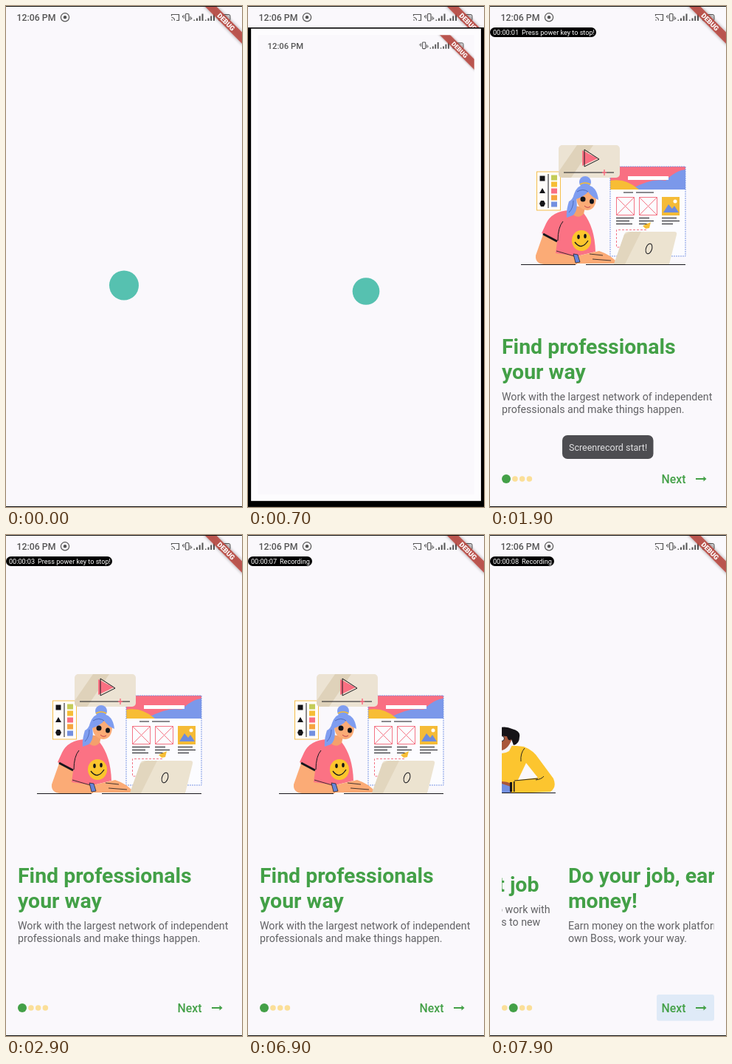
These frames come from a looping animation (320 by 677 pixels, 8000 ms). An HTML page:

```html
<!DOCTYPE html>
<html lang="en">
<head>
<meta charset="utf-8">
<title>Onboarding</title>
<style>
  html, body { margin: 0; width: 100%; height: 100%; overflow: hidden; background: #faf8fc; }
  svg { display: block; font-family: Roboto, sans-serif; }
  .title { font-size: 28.45px; font-weight: 700; fill: #43a047; }
  .body { font-size: 14.2px; fill: #626265; }
  .line { fill: none; stroke: #17171c; }
  .pill { font-size: 9.1px; fill: #fff; }
</style>
</head>
<body>
<svg width="320" height="677" viewBox="0 0 320 677">
  <defs>
    <clipPath id="view"><rect x="16" y="60" width="288" height="550"/></clipPath>
    <clipPath id="below"><rect y="29" width="320" height="648"/></clipPath>
    <clipPath id="pillClip"><rect id="pillCut" y="28" width="144" height="15"/></clipPath>
    <clipPath id="corner"><rect width="320" height="677"/></clipPath>
    <clipPath id="header"><rect x="163" y="217" width="102" height="31"/></clipPath>
    <clipPath id="card"><rect x="93" y="188" width="83" height="44" rx="5"/></clipPath>
    <filter id="shade" x="-20%" y="-80%" width="140%" height="260%">
      <feDropShadow dx="0" dy="0" stdDeviation="2" flood-opacity=".45"/>
    </filter>
    <g id="banner" clip-path="url(#corner)">
      <g transform="translate(320 0) rotate(45)">
        <rect x="-40" y="25" width="80" height="11" fill="#b94a43" fill-opacity=".88" filter="url(#shade)"/>
        <text y="33.8" font-size="9.2" font-weight="900" text-anchor="middle" fill="#fff">DEBUG</text>
      </g>
    </g>
    <g id="status" fill="#555" stroke="none">
      <text x="14.5" y="20" font-size="12.3" font-weight="500">12:06 PM</text>
      <rect x="243.5" y="10.5" width="4.5" height="9.5" rx="1" fill="none" stroke="#555" stroke-width="1.2"/>
      <path d="M241.2 12v5M239.5 13v2.500M250 14v5M251.700 15.500v2.500" stroke="#555"/>
      <g id="bars"><path d="M254.500 18.500h1.500v1.500h-1.500zM258 16.500h2v3.500h-2zM261.700 13.500h2v6.500h-2zM265.500 10.500h2v9.500h-2z"/></g>
      <use href="#bars" x="15.5"/>
      <rect x="288" y="11.500" width="16" height="8.500" rx="2" fill="#555" fill-opacity=".25" stroke="#555"/>
      <rect x="290" y="13.500" width="9" height="4.500" opacity=".5"/>
    </g>
    <circle id="mark" cx="160" cy="377.500" r="20" fill="#56c1b0"/>
  </defs>

  <rect width="320" height="677" fill="#faf8fc"/>
  <use id="splash" href="#mark"/>

  <g id="app">
    <g clip-path="url(#view)"><g id="track">
      <g>
        <rect x="163" y="217" width="102" height="121" fill="#fcfcff"/>
        <g clip-path="url(#header)">
          <rect x="163" y="217" width="102" height="31" fill="#f96f82"/>
          <path d="M190 248Q218 232 238 236Q252 222 265 221V248Z" fill="#7b98ea"/>
          <path d="M163 236Q184 232 202 248H163Z" fill="#f7bd35"/>
        </g>
        <rect x="163" y="217" width="102" height="121" fill="none" stroke="#7a96e4" stroke-dasharray="2 1"/>
        <rect x="187" y="230" width="55" height="5" fill="#fff"/>
        <path class="line" d="M181 252h13M198 252h24"/>
        <g fill="none" stroke="#f47585">
          <path d="M171.500 258.500h24v24h-24zl24 24m0-24l-24 24M202.500 258.500h24v24h-24zl24 24m0-24l-24 24"/>
          <path d="M212 302.500H171.500V326H186" stroke-dasharray="3 2"/>
        </g>
        <rect x="233" y="258" width="24" height="25" fill="#f5bb36"/>
        <path d="M235 279l7-11 5 6 3-4 6 9z" fill="#6e8bdc"/><circle cx="251" cy="264" r="2.500" fill="#fff"/>
        <path class="line" d="M171 286.500h24M171 290.500h18M171 294.500h22M202 286.500h14M202 290.500h20M202 294.500h13M233 286.500h20M233 290.500h24M233 294.500h15"/>
        <path d="M218 292l-2 8-5 1-4-4z" fill="#f7bd35"/>

        <rect x="63.500" y="224" width="32" height="52" fill="#fffdfa" stroke="#f6bf4c"/>
        <path d="M67.500 229.500h7v7h-7zM71 246l4 7h-8zM69 263h4l2 4-2 4h-4l-2-4z" fill="#141418"/>
        <path class="line" d="M79 227V273"/>
        <rect x="83" y="228.500" width="8" height="7" fill="#c4cc58"/><rect x="83" y="237.500" width="8" height="7" fill="#f6bd35"/>
        <rect x="83" y="246.500" width="8" height="7" fill="#f96f82"/><rect x="83" y="255.500" width="8" height="7" fill="#f6a43f"/>
        <rect x="83" y="264.500" width="8" height="7" fill="#7390e0"/>

        <g clip-path="url(#card)">
          <rect x="93" y="188" width="83" height="44" fill="#ece3d3"/>
          <path d="M118 188h22l-30 44H93V224z" fill="#dfd2ba"/>
        </g>
        <path d="M125 195v21l21-10z" fill="#f96f82"/><path class="line" d="M128 194v23l20-10z"/>
        <path class="line" d="M100 225H168"/><path d="M155 221v8M152 225h6" stroke="#f96f82" stroke-width="1.500"/>

        <path class="line" d="M42 349.500H116M130 349.500H265"/>
        <path d="M73 306L62 337Q61 348 73 349H118L119 337 92 331 94 316Z" fill="#fbab76"/>
        <path d="M108 276Q84 277 76 294L70 307 91 319 89 334 118 338 143 332Q142 299 127 280Z" fill="#fb7284"/>
        <path class="line" d="M72 308L91 318" stroke-width="3"/>
        <path class="line" d="M92 317Q92 299 99 291"/>
        <path d="M114 270L108 277Q118 290 127 281L129 272Z" fill="#f5a06c"/>
        <path d="M117 252Q115 274 132 276Q145 275 144 255Q138 246 117 252Z" fill="#fbab76"/>
        <circle cx="129" cy="238" r="8" fill="#7f9df0"/>
        <path d="M122 241q7-4 14 0" fill="none" stroke="#f7bd35" stroke-width="1.500"/>
        <path d="M114 254Q119 240 131 242Q145 243 147 262Q139 259 133 251Q127 258 117 261Q120 277 112 283L104 286Q103 277 107 264Q112 262 114 254Z" fill="#7f9df0"/>
        <path d="M113 263q0 10-6 16M118 251q8-5 15 0" fill="none" stroke="#506cbb"/>
        <ellipse cx="126" cy="261" rx="3.500" ry="3.500" fill="#141418"/><ellipse cx="138" cy="264" rx="3" ry="3.500" fill="#141418"/>
        <path d="M128 270q4 4 8 1" fill="none" stroke="#c5434d"/>
        <ellipse cx="124" cy="317" rx="13" ry="14" fill="#fbc52d"/>
        <ellipse cx="120" cy="312" rx="1.800" ry="3" fill="#141418"/><ellipse cx="129" cy="311" rx="1.800" ry="3" fill="#141418"/>
        <path class="line" d="M115 319Q124 331 133 317" stroke-width="1.300"/>
        <path d="M118 338L148 331Q166 337 173 348H116Z" fill="#fbab76"/>
        <path class="line" d="M135 335l18 2M139 342l25 2M90 331l24 7" stroke-width=".8"/>
        <path d="M113 335l6 1 3 10-6 1z" fill="#6684d8" stroke="#17171c" stroke-width=".7"/>
        <path d="M187 305H250Q254 305 253 309L243 349H168L182 309Q183 305 187 305Z" fill="#ece3d0"/>
        <path d="M190 305h15l-22 44h-15l14-40z" fill="#e2d6be"/>
        <ellipse class="line" cx="215.500" cy="328" rx="4" ry="7" transform="rotate(18 215.500 328)"/>
        <text class="title" x="16" y="470">Find professionals</text>
        <text class="title" x="16" y="504">your way</text>
        <text class="body" x="16" y="533">Work with the largest network of independent</text>
        <text class="body" x="16" y="550">professionals and make things happen.</text>
      </g>

      <g transform="translate(288 0)">
        <g transform="translate(16 0)">
          <path d="M172 291Q196 282 228 286Q241 291 248 302L268 329Q273 341 264 347L212 349H138Q124 346 130 332Z" fill="#fcc52f"/>
          <path d="M231 308L247 328 220 331Z" fill="#faf8fc"/>
          <path class="line" d="M229 288q-6 7-5 18M244 331q8-1 11-5M215 332l32-3" stroke-width=".9"/>
          <path d="M188 284h24l-4 8q-10 6-18 0z" fill="#f5f4f8"/>
          <path d="M184 264Q181 290 198 291Q208 289 213 272L209 266Z" fill="#a9573b"/>
          <path d="M182 270Q179 260 190 262Q202 257 212 262Q224 265 222 273Q222 282 214 284L211 276Q207 280 205 272Q193 271 182 270Z" fill="#151317"/>
          <circle cx="198" cy="275" r="3.500" fill="#f5f4f8" stroke="#17171c"/><circle cx="187" cy="275" r="3.500" fill="#f5f4f8" stroke="#17171c"/>
          <path d="M189 285q4 2 7-1" fill="none" stroke="#fff"/>
          <path d="M184 336q15-6 27 0v12h-27z" fill="#a9573b"/>
          <path d="M198 336l12 4v8h-18z" fill="#7390e0"/>
          <path d="M209 334h3v13h-3zM214 333h1.500v14h-1.500z" fill="#151317"/>
          <path d="M107 309h65l10 39h-65z" fill="#ece3d0"/>
          <path class="line" d="M26 348.500H271"/>
        </g>
        <text class="title" x="16" y="482">Find the perfect job</text>
        <text class="body" x="16" y="511">Meet partners you're inspired to work with</text>
        <text class="body" x="16" y="528">and take your career or business to new</text>
        <text class="body" x="16" y="545">heights.</text>
      </g>

      <g transform="translate(576 0)">
        <text class="title" x="16" y="470">Do your job, earn</text>
        <text class="title" x="16" y="504">money!</text>
        <text class="body" x="16" y="533">Earn money on the work platform, be your</text>
        <text class="body" x="16" y="550">own Boss, work your way.</text>
      </g>
    </g></g>

    <g id="dots"><circle cy="639"/><circle cy="639"/><circle cy="639"/><circle cy="639"/></g>
    <rect id="tap" x="226" y="621" width="78" height="35.500" rx="3" fill="#dfeaf7"/>
    <text x="232.500" y="644.500" font-size="15.800" font-weight="500" fill="#43a047">Next</text>
    <path d="M279 639h12" stroke="#43a047" stroke-width="2"/>
    <path d="M289.500 635.500l4 3.500-4 3.500z" fill="#43a047"/>
  </g>

  <use href="#status"/>
  <use href="#banner"/>
  <g fill="none" stroke="#555" stroke-width="1.200">
    <circle cx="80" cy="15.300" r="5.600"/><circle cx="80" cy="15.300" r="1.700" fill="#555"/>
    <path d="M224.500 13.500V11.500H234.500V19.500H231M224.500 15.500q4 0 4 4M224.500 18.500l1 1"/>
  </g>

  <g id="shot" clip-path="url(#below)">
    <rect y="29" width="320" height="648"/>
    <g id="sheet">
      <rect x="-10" y="-9.500" width="340" height="696" fill="#fdfcfe"/>
      <rect width="320" height="677" fill="#faf8fc"/>
      <use href="#mark"/><use href="#status"/><use href="#banner"/>
    </g>
  </g>

  <g id="pill" clip-path="url(#pillClip)">
    <rect id="pillBox" y="29" height="13" rx="6.500"/>
    <text class="pill" id="clock" x="4" y="39.300"></text>
    <text class="pill" id="hint" x="43" y="39.300"></text>
  </g>
  <g id="toast">
    <rect x="98" y="580" width="123.500" height="32" rx="7" fill="#4d4d51"/>
    <text x="107" y="601" font-size="12.500" fill="#e2e2e4">Screenrecord start!</text>
  </g>
  <path d="M0 .5H320M0 676.500H320" stroke="#111"/>
</svg>
<script>
const LOOP = 8000, STEP = 100, PAGE = 288;
const TICKS = [2000, 2900, 3900, 5000, 5900, 6900, 7900];
const $ = id => document.getElementById(id);
const set = (el, attrs) => { for (const k in attrs) el.setAttribute(k, attrs[k]); };
const show = (id, on) => set($(id), { opacity: +on });
const ramp = (t, from, to) => Math.min(1, Math.max(0, (t - from) / (to - from)));
const easeOut = p => 1 - (1 - p) ** 2.87;

function drawDots(active) {
  let x = 16;
  [...$('dots').children].forEach((dot, i) => {
    const on = i === active, size = on ? 12 : 7.5;
    set(dot, { cx: x + size / 2, r: size / 2, fill: on ? '#43a047' : '#fbdf98' });
    x += size + 2.2;
  });
}

function draw(t) {
  // Screenshot sheet shrinks, then gives way to the first page
  const shrink = easeOut(ramp(t, 0, 700));
  set($('sheet'), { transform: `translate(${13.3 * shrink} ${39.3 * shrink}) scale(${1 - 0.083 * shrink})` });
  show('shot', t < 100 ? 0 : 1 - ramp(t, 700, 900));
  show('splash', t < 800);
  show('app', t >= 800);

  // Recorder pill and toast
  const short = t >= 5000;
  show('pill', t >= 1000);
  set($('pillBox'), { width: short ? 87 : 144 });
  set($('pillCut'), { width: t >= 4900 ? 87 : 144 });
  $('clock').textContent = '00:00:0' + (1 + TICKS.filter(tick => t >= tick).length);
  $('hint').textContent = short ? 'Recording' : 'Press power key to stop!';
  show('toast', ramp(t, 900, 1300) * (1 - ramp(t, 1900, 2100)));

  // Two taps on Next
  const page = easeOut(ramp(t, 7400, 7700)) + easeOut(ramp(t, 7800, 8100));
  set($('track'), { transform: `translate(${-PAGE * page} 0)` });
  show('tap', t >= 7500);
  drawDots(t >= 7600 ? 1 : 0);
}

function loop() {
  const t = performance.now() % LOOP;
  draw(Math.floor(t / STEP) * STEP);
  requestAnimationFrame(loop);
}
loop();
</script>
</body>
</html>
```
